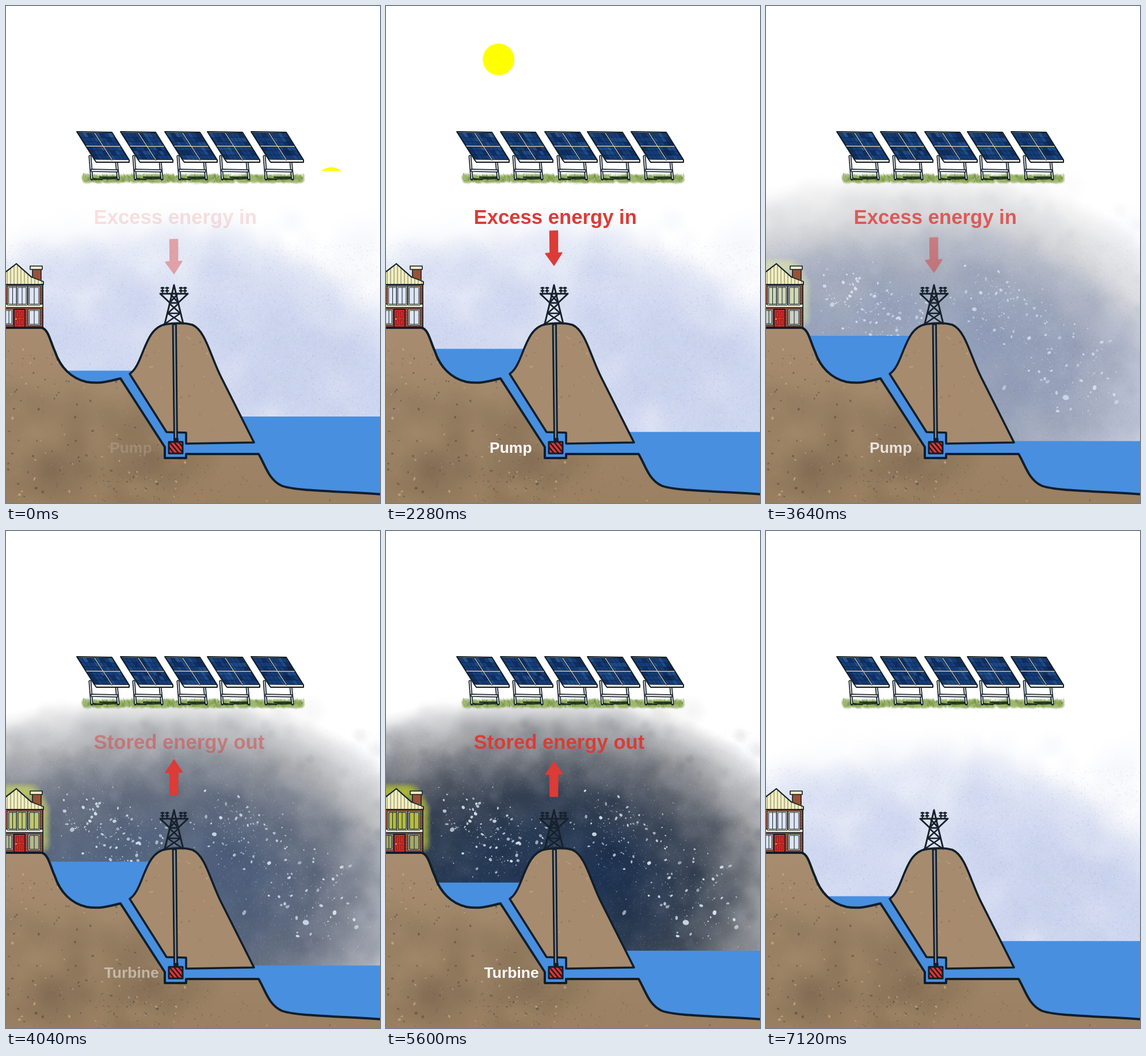
An HTML page with a canvas for the animation above (7.16 s loop, 650 px wide and 862 px high).

```html
<!DOCTYPE html>
<html lang="en">
<head>
<meta charset="utf-8">
<title>Pumped storage</title>
<style>
html, body { margin: 0; width: 100%; height: 100%; overflow: hidden; background: #fff; }
#stage { position: relative; width: 650px; height: 862px; overflow: hidden; }
canvas, svg { position: absolute; left: 0; top: 0; width: 650px; height: 862px; }
text { font: bold 34.7px "Liberation Sans", Arial, sans-serif; fill: #dc3b36; }
.label { font-size: 26.5px; fill: #fff; }
.arrow { fill: #dc3b36; stroke: #dc3b36; stroke-width: 1.5; stroke-linejoin: round; }
.water { fill: #488fe0; }

.night, .in, .inArrow, .out, .outArrow, .down, .up, .upper, .lower, .sunX, .sunY {
  animation: 7160ms linear infinite;
}
.night { animation-name: night; }
.in { animation-name: in; }
.inArrow { animation-name: inArrow; }
.out { animation-name: out; }
.outArrow { animation-name: outArrow; }
.upper { animation-name: upper; }
.lower { animation-name: lower; }
.down { animation-name: down; animation-timing-function: cubic-bezier(.364, 0, .636, 1); }
.up { animation-name: up; animation-timing-function: cubic-bezier(.364, 0, .636, 1); }
.sunX { animation-name: sunX; }
.sunY { animation-name: sunY; }

@keyframes night { 0%, 45.8% { opacity: 0 } 60.3%, 91.06% { opacity: 1 } 99.2%, 100% { opacity: 0 } }
@keyframes in { 0%, 100% { opacity: .15 } 3.63%, 50.28% { opacity: 1 } 53.07%, 99.44% { opacity: 0 } }
@keyframes inArrow { 0%, 100% { opacity: .4 } .9%, 50.28% { opacity: 1 } 51.4%, 99.44% { opacity: 0 } }
@keyframes out { 0%, 54.47% { opacity: 0 } 58.66%, 91.06% { opacity: 1 } 95.25%, 100% { opacity: 0 } }
@keyframes outArrow { 0%, 54.47% { opacity: 0 } 55.87%, 91.06% { opacity: 1 } 92.2%, 100% { opacity: 0 } }
@keyframes upper {
  0%, 100% { transform: translateY(632.5px) }
  52.51%, 54.34% { transform: translateY(570px) }
  92.47%, 99.44% { transform: translateY(633.5px) }
}
@keyframes lower {
  0%, 100% { transform: translateY(712px) }
  52.51%, 54.34% { transform: translateY(756px) }
  92.47%, 99.44% { transform: translateY(711.2px) }
}
@keyframes down {
  0%, 12.29%, 24.58%, 36.87%, 49.16%, 61.45%, 100% { transform: translateY(16px) }
  6.145%, 18.436%, 30.726%, 43.017%, 55.307% { transform: none }
}
@keyframes up {
  0%, 54.47%, 66.76%, 79.05%, 91.34%, 100% { transform: translateY(16px) }
  60.61%, 72.91%, 85.2%, 97.49% { transform: none }
}
@keyframes sunX {
  0% { transform: translateX(565px) }
  2.09% { transform: translateX(568px); animation-timing-function: cubic-bezier(.364, 0, .682, .5) }
  24.02% { transform: translateX(325px); animation-timing-function: cubic-bezier(.318, .5, .636, 1) }
  45.95%, 100% { transform: translateX(82px) }
}
@keyframes sunY {
  0% { transform: translateY(307.5px); animation-timing-function: cubic-bezier(.333, .65, .667, 1) }
  24.02% { transform: translateY(66px); animation-timing-function: cubic-bezier(.333, 0, .667, .35) }
  48.04% { transform: translateY(307.5px) }
  51%, 100% { transform: translateY(340px) }
}
</style>
</head>
<body>
<div id="stage">
  <canvas id="day" width="650" height="862"></canvas>
  <canvas id="dark" class="night" width="650" height="862"></canvas>

  <svg viewBox="0 0 650 862">
    <clipPath id="horizon"><rect width="650" height="285.5"/></clipPath>
    <g clip-path="url(#horizon)">
      <g class="sunX"><circle class="sunY" r="27.5" fill="#ff0"/></g>
    </g>
    <rect class="water upper" x="50" width="215" height="100"/>
    <rect class="water lower" x="375" width="275" height="160"/>
    <path class="water" d="M196 643L216 636L282 738H314V757H433L446 780H312V788H272V765Z"/>
  </svg>

  <canvas id="front" width="650" height="862"></canvas>

  <svg viewBox="0 0 650 862">
    <g id="lit" class="night" stroke="#16212b" stroke-width="1"></g>
    <g class="in">
      <text x="152.5" y="378">Excess energy in</text>
      <text class="label" x="180" y="775">Pump</text>
    </g>
    <g class="inArrow">
      <path class="arrow down" d="M284.5 389L298.5 388.5V427L306 426.5L292 448.5L277 428L285 427Z"/>
    </g>
    <g class="out">
      <text x="152.5" y="378">Stored energy out</text>
      <text class="label" x="170.5" y="775">Turbine</text>
    </g>
    <g class="outArrow">
      <path class="arrow up" d="M292 384.5L306.5 406L299 406.5L298.5 445L285 445.5L284.5 407L277 407Z"/>
    </g>
  </svg>
</div>

<script>
const INK = '#101e29';
const W = 650, H = 862;
const ctxOf = id => document.getElementById(id).getContext('2d');

let seed = 7;
function rnd() {
  seed = (seed + 0x6D2B79F5) | 0;
  let v = Math.imul(seed ^ (seed >>> 15), 1 | seed);
  v = (v + Math.imul(v ^ (v >>> 7), 61 | v)) ^ v;
  return ((v ^ (v >>> 14)) >>> 0) / 4294967296;
}
const span = (a, b) => a + (b - a) * rnd();
const bell = s => (rnd() + rnd() + rnd() - 1.5) * s;

function blob(c, x, y, r, rgb, a) {
  const g = c.createRadialGradient(x, y, 0, x, y, r);
  g.addColorStop(0, `rgba(${rgb},${a})`);
  g.addColorStop(.5, `rgba(${rgb},${a * .6})`);
  g.addColorStop(1, `rgba(${rgb},0)`);
  c.fillStyle = g;
  c.fillRect(x - r, y - r, r * 2, r * 2);
}

function fleck(c, x, y, r, color) {
  c.fillStyle = color;
  c.beginPath();
  c.ellipse(x, y, r, r * span(.5, .9), span(0, 3), 0, 7);
  c.fill();
}

function shape(c, d, fill, line, width = 2) {
  const p = new Path2D(d);
  if (fill) { c.fillStyle = fill; c.fill(p); }
  if (line) {
    c.strokeStyle = line;
    c.lineWidth = width;
    c.lineJoin = c.lineCap = 'round';
    c.stroke(p);
  }
  return p;
}

function grain(c, n, top, a) {
  for (let i = 0; i < n; i++) {
    c.fillStyle = rnd() < .5 ? `rgba(255,255,255,${a})` : `rgba(60,70,100,${a * .5})`;
    c.fillRect(span(0, W), span(top, 780), 1.5, 1.5);
  }
}

function paintDay(c) {
  const edge = x => 365 + 45 * Math.exp(-x / 60) + 150 * Math.pow(Math.max(0, x - 360) / 290, 1.5);
  for (let i = 0; i < 1100; i++) {
    const x = span(-40, 690), r = span(25, 65), top = edge(x);
    const y = span(top + 20, 780);
    blob(c, x, y, r, '204,213,239', .2 * Math.min(1, (y - top) / 130));
  }
  for (let i = 0; i < 60; i++)
    blob(c, 515 + bell(170), 625 + bell(110), span(25, 55), '192,200,232', .12);
  for (let i = 0; i < 40; i++)
    blob(c, span(330, 650), span(370, 520), span(20, 50), '226,231,246', .14);
  grain(c, 9000, 410, .16);
}

function paintNight(c) {
  const cx = 300, cy = 620, ry = 337;
  const rx = side => side < 0 ? 700 : 465;
  const depth = (x, y) => Math.hypot((x - cx) / rx(x - cx), (y - cy) / ry);
  for (const side of [-1, 1]) {
    c.save();
    c.translate(cx, cy);
    c.scale(rx(side), ry);
    const g = c.createRadialGradient(0, 0, 0, 0, 0, 1);
    [[0, '34,56,88,1'], [.3, '40,58,84,1'], [.5, '60,71,88,1'], [.65, '100,105,114,1'],
     [.76, '145,147,151,1'], [.86, '183,184,186,1'], [.93, '210,210,212,.75'], [1, '225,225,227,0']]
      .forEach(([at, rgba]) => g.addColorStop(at, `rgba(${rgba})`));
    c.fillStyle = g;
    c.fillRect(Math.min(0, side), -1, 1, 2);
    c.restore();
  }

  for (let i = 0; i < 900; i++) {
    const x = span(-20, 670), y = span(330, 750), d = depth(x, y);
    if (d > .92) continue;
    const pale = rnd() < .35 + d * .25;
    blob(c, x, y, span(8, 34), pale ? '205,208,214' : '20,32,52', pale ? .1 * d : .13 * (1 - d * .5));
  }
  for (let i = 0; i < 90; i++) {
    const x = span(0, 650), y = span(300, 440), d = depth(x, y);
    if (d > .84 && d < 1.06) blob(c, x, y, span(12, 30), '208,208,210', .22);
  }
  blob(c, 390, 590, 75, '22,44,80', .5);
  grain(c, 9000, 345, .11);

  // light spilling from the house
  for (let i = 0; i < 11; i++) {
    const k = i / 10;
    blob(c, Math.min(62, k * 110), 453 + Math.max(0, k - .4) * 150, 18, '182,192,55', .8);
  }

  const star = (x, y, r) => fleck(c, x, y, r, `rgba(215,225,235,${span(.55, 1)})`);
  for (let i = 0; i < 170; i++) {
    const k = rnd();
    star(120 + k * 130 + bell(55), 495 + k * 55 + bell(65), .7 + 2.7 * rnd() ** 3);
  }
  for (let i = 0; i < 290; i++) {
    const k = rnd();
    star(345 + k * 235 + bell(65), 465 + k * 195 + bell(80), .7 + 2.8 * rnd() ** 4);
  }
  [[521, 679, 5.5], [414, 662, 4.5], [505, 671, 3.5], [609, 687, 4], [115, 518, 4], [229, 541, 4],
   [362, 526, 4], [571, 662, 4], [598, 581, 3.5], [262, 540, 3.5]].forEach(s => star(...s));
}

const GROUND = 'M-5 558L62 558C74 561 77 582 85 599C94 626 113 646 140 652C164 656 181 650 199 646' +
  'L276 765V784H313V777L439 777C451 797 456 821 479 832C502 841 570 841 655 847';
const HILL = 'M215 638C240 622 239 558 278 552C296 549 310 549 324 553C347 563 355 607 374 644' +
  'L431 757L313 759V740L279 739Z';

function paintGround(c) {
  const body = new Path2D(GROUND + 'V870H-5Z');
  const g = c.createLinearGradient(0, 560, 0, 862);
  g.addColorStop(0, '#a88c6f');
  g.addColorStop(.35, '#a2886b');
  g.addColorStop(1, '#9b8062');
  c.save();
  c.fillStyle = g;
  c.fill(body);
  c.clip(body);
  for (let i = 0; i < 90; i++)
    blob(c, span(-20, 330), span(660, 870), span(20, 65), rnd() < .65 ? '104,86,64' : '168,142,112', .13);
  for (let i = 0; i < 430; i++) {
    const x = span(0, rnd() < .75 ? 300 : 650), y = span(570, 862);
    const light = rnd() < .45;
    fleck(c, x, y, .6 + 2.2 * rnd() ** 3, light ? 'rgba(200,168,132,.75)' : 'rgba(82,74,62,.55)');
  }
  for (let i = 0; i < 170; i++)
    fleck(c, 265 + bell(190), 833 + bell(50), span(.5, 1.5), 'rgba(92,92,88,.55)');
  c.restore();

  const hill = shape(c, HILL, '#a78b6e');
  c.save();
  c.clip(hill);
  for (let i = 0; i < 70; i++)
    fleck(c, span(215, 430), span(560, 755), span(.5, 2), rnd() < .7 ? 'rgba(202,170,136,.7)' : 'rgba(130,106,82,.6)');
  c.restore();
  shape(c, HILL, null, INK, 3.6);
  shape(c, GROUND, null, INK, 4);
}

function paintPump(c) {
  shape(c, 'M290 552H295.5L297.5 752H292.5Z', '#8d8d90', INK, 2.8);
  shape(c, 'M292 750H299V757H292Z', INK, INK, 1.5);
  const box = shape(c, 'M283 756H307V776H283Z', '#e0342f');
  c.save();
  c.clip(box);
  for (let x = 266; x < 310; x += 8) shape(c, `M${x} 754L${x + 20} 778`, null, INK, 2.4);
  c.restore();
  shape(c, 'M283 756H307V776H283Z', null, INK, 3);
}

function paintTower(c) {
  const line = (d, w = 3) => shape(c, d, null, '#16212b', w);
  line('M276 551L285 514L292 484L299 514L308 551');
  line('M268 499H316M269 500L285 515H299L315 500M285 514L297 501M299 514L287 501');
  line('M284 516L303 533M300 516L281 533M281 533H303M281 533L306 550M303 533L278 550', 2.6);
  line('M275 551H309', 2.5);
  for (const x of [272, 280, 304, 311]) {
    line(`M${x} 488V498`, 2);
    line(`M${x - 2} 489H${x + 2}M${x - 2} 494H${x + 2}`, 3);
  }
}

const PANES = [[5, 488, 13, 29], [21, 488, 14, 29], [41, 488, 16, 29], [0, 528, 10, 23], [41, 528, 16, 24]];

function paintHouse(c) {
  shape(c, 'M46 456H61V480H46Z', '#9a5136', INK, 1.6);
  shape(c, 'M42 451H63V457H42Z', '#f1eec4', INK, 1.6);
  shape(c, 'M-4 481H64V557H-4Z', '#95513a', INK, 1.8);
  for (let y = 486; y < 556; y += 5) shape(c, `M0 ${y}H63`, null, 'rgba(60,28,18,.35)', 1);
  const roof = shape(c, 'M-6 466L18 447L45 470L65 477V483H-6Z', '#f1efc0');
  c.save();
  c.clip(roof);
  for (let x = 2; x < 64; x += 6) shape(c, `M${x} 450V482`, null, 'rgba(70,70,40,.7)', 1);
  c.restore();
  shape(c, 'M-4 464L18 447L44 470', null, INK, 2.2);
  shape(c, 'M44 470L65 478V483H-4', null, INK, 1.8);
  shape(c, 'M-4 517H64V523H-4Z', '#f3f0d0', INK, 1.3);
  for (const [x, y, w, h] of PANES) {
    shape(c, `M${x - 2} ${y - 2}h${w + 4}v${h + 4}h${-w - 4}Z`, '#f6f4e6', INK, 1);
    shape(c, `M${x} ${y}h${w}v${h}h${-w}Z`, '#dfe5f5', INK, 1);
    shape(c, `M${x + w / 2} ${y}v${h}`, null, INK, 1);
  }
  shape(c, 'M14 526H33V557H14Z', '#d42a26', INK, 1.8);
  shape(c, 'M18 530H22V540H18ZM26 530H30V540H26ZM18 544H22V553H18ZM26 544H30V553H26Z', null, '#8d1916', 1);
  fleck(c, 17.5, 543, 1.5, '#f3d34a');
  shape(c, 'M-4 557.5H64', null, INK, 2.5);
}

function paintGrass(c) {
  for (let i = 0; i < 700; i++)
    blob(c, span(136, 514), span(296, 303), span(5, 8), rnd() < .65 ? '140,168,88' : '172,194,126', .5);
  for (let i = 0; i < 380; i++) {
    const x = span(134, 518), y = span(293, 306);
    shape(c, `M${x} ${y}l${bell(2)} -3`, null, 'rgba(88,124,50,.55)', .9);
  }
}

function paintPanel(c, x0) {
  c.save();
  c.translate(x0, 217);
  shape(c, 'M26 82l18 2M30 84l24 -2M52 83l20 -1M40 80h30', null, '#22351f', 2.4);
  for (const [x, top] of [[23, 44], [69, 53]])
    shape(c, `M${x} ${top}L${x + 3} 83`, null, INK, 5);
  for (const [x, top] of [[23, 44], [69, 53]])
    shape(c, `M${x} ${top}L${x + 3} 82`, null, '#e6e6e6', 1.8);
  shape(c, 'M25 66L71 67V71L25 70Z', '#e6e6e6', INK, 1.4);
  shape(c, 'M0 1L61 2L91 50V54L34 54L31 50Z', '#e9e7e2', INK, 2);

  const at = (u, v) => `${2 + u * 58 + v * 30} ${3 + u * .5 + v * 46}`;
  const seg = (u, v, p, q) => `M${at(u, v)}L${at(p, q)}`;
  shape(c, `M${at(0, 0)}L${at(1, 0)}L${at(1, 1)}L${at(0, 1)}Z`, '#153d79', INK, 1.2);
  for (let i = 0; i < 26; i++) {
    const u = Math.floor(rnd() * 8) / 8, v = Math.floor(rnd() * 6) / 6;
    shape(c, `M${at(u, v)}L${at(u + .125, v)}L${at(u + .125, v + .166)}L${at(u, v + .166)}Z`,
      rnd() < .5 ? 'rgba(46,98,158,.4)' : 'rgba(10,28,66,.4)');
  }
  for (let i = 1; i < 8; i++) shape(c, seg(i / 8, 0, i / 8, 1), null, 'rgba(9,24,54,.6)', .8);
  for (let i = 1; i < 6; i++) shape(c, seg(0, i / 6, 1, i / 6), null, 'rgba(9,24,54,.6)', .8);
  shape(c, seg(.5, 0, .5, 1) + seg(0, .5, 1, .5), null, INK, 3);
  shape(c, seg(.5, 0, .5, 1) + seg(0, .5, 1, .5), null, '#dcd5cb', 1.3);
  c.restore();
}

paintDay(ctxOf('day'));
paintNight(ctxOf('dark'));
const front = ctxOf('front');
paintGround(front);
paintPump(front);
paintTower(front);
paintHouse(front);
paintGrass(front);
[123, 199, 276, 350, 426].forEach(x => paintPanel(front, x));

document.getElementById('lit').innerHTML = PANES.map(([x, y, w, h], i) =>
  `<path d="M${x} ${y}h${w}v${h}h${-w}ZM${x + w / 2} ${y}v${h}" fill="${i < 3 ? '#b5be3c' : '#a5aa68'}"/>`).join('');
</script>
</body>
</html>
```
